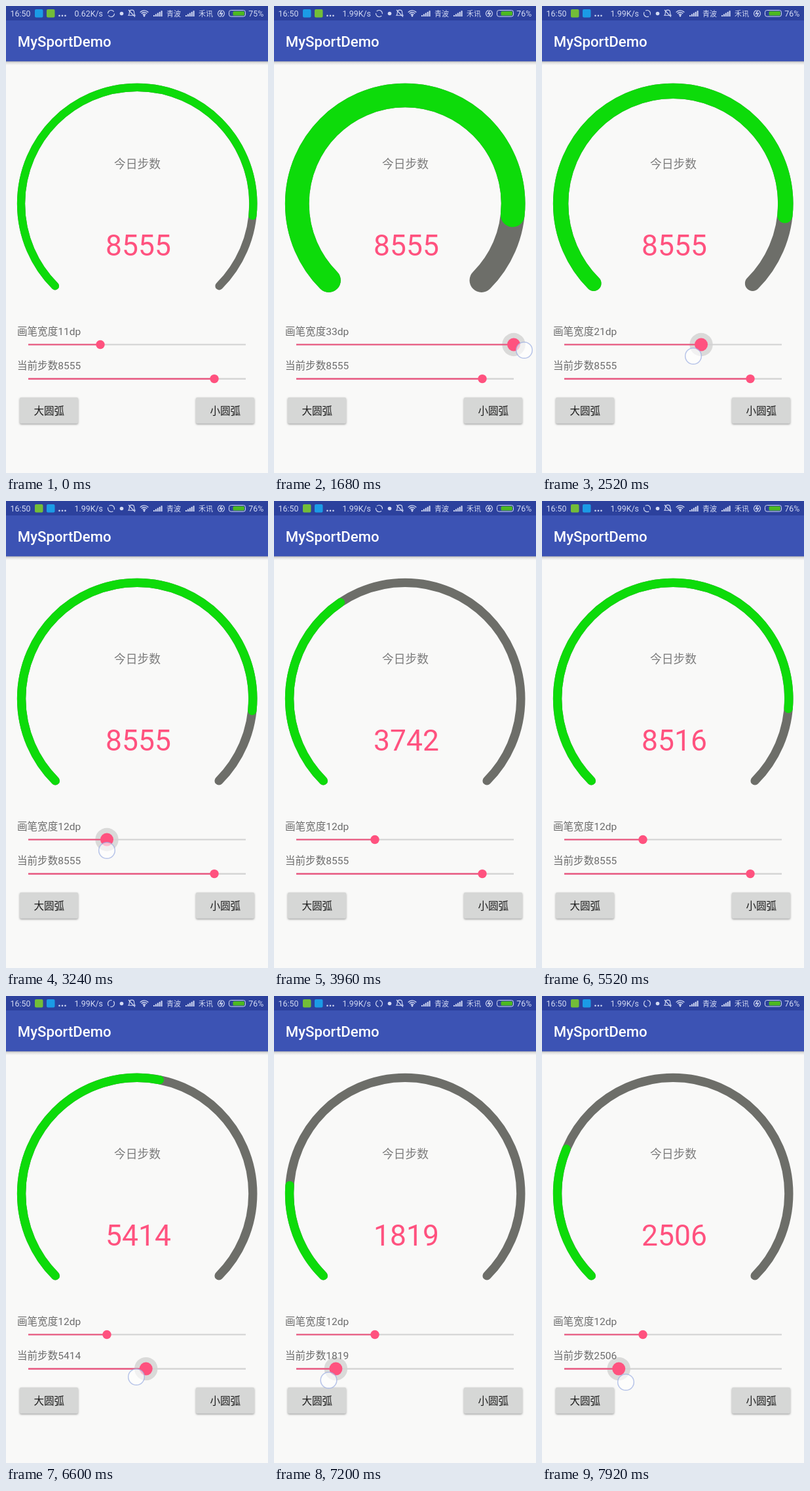
Write an HTML page with a canvas that moves like this. It is 400x711 px and loops after 8 s.

```html
<!DOCTYPE html>
<html lang="zh-CN">
<head>
<meta charset="utf-8">
<title>Step counter</title>
<style>
  html, body { margin: 0; width: 100%; height: 100%; overflow: hidden; background: #f9f9f8; }
  canvas { display: block; width: 400px; height: 711px; }
</style>
</head>
<body>
<canvas id="stage"></canvas>
<script>
const W = 400, H = 711, LOOP = 8000, STEP = 120;
const TAU = Math.PI * 2;
const FONT = 'Roboto, "Noto Sans CJK SC", "Noto Sans CJK", sans-serif';
const PINK = '#ff527f', ICON = '#d3daf3';
const DP = 400 / 360;
const TRACK = { x: 34, length: 332 };
const LAG = 67; // the thumb trails the finger

// Finger paths: [time, x, y]
const widthDrag = {
  from: 120, to: 3300,
  path: [[120, 144, 522], [240, 146, 522], [420, 176, 522], [1080, 366, 523], [1200, 386, 524],
         [1560, 386, 524], [1680, 382, 524], [2520, 231, 533], [2880, 172, 533], [3120, 154, 532]]
};
const stepsDrag = {
  from: 5880, to: LOOP,
  path: [[6000, 318.03, 576], [6120, 304.6, 577], [6600, 199, 580], [7080, 103, 584],
         [7320, 64, 586], [7500, 60.3, 587], [7920, 128, 588]]
};
const count = { start: 3388.7, length: 2285.6, total: 8555 };

const canvas = document.getElementById('stage');
const ctx = canvas.getContext('2d');
const ratio = window.devicePixelRatio || 1;
canvas.width = Math.round(W * ratio);
canvas.height = Math.round(H * ratio);
ctx.scale(ratio, ratio);

const clamp = (v, lo, hi) => Math.min(hi, Math.max(lo, v));

function along(path, t) {
  if (t <= path[0][0]) return path[0].slice(1);
  for (let i = 1; i < path.length; i++) {
    const a = path[i - 1], b = path[i];
    if (t <= b[0]) {
      const k = (t - a[0]) / (b[0] - a[0]);
      return [a[1] + (b[1] - a[1]) * k, a[2] + (b[2] - a[2]) * k];
    }
  }
  return path[path.length - 1].slice(1);
}

const thumbX = (drag, t) =>
  clamp(along(drag.path, t - LAG)[0], TRACK.x, TRACK.x + TRACK.length);
const share = x => (x - TRACK.x) / TRACK.length;
const isHeld = (drag, t) => t >= drag.from && t < drag.to;

function text(str, x, y, size, color, align = 'left', weight = 400) {
  ctx.font = `${weight} ${size}px ${FONT}`;
  ctx.textAlign = align;
  ctx.fillStyle = color;
  ctx.fillText(str, x, y);
}

function rect(x, y, w, h, color, r = 0) {
  ctx.fillStyle = color;
  ctx.beginPath();
  ctx.roundRect(x, y, w, h, r);
  ctx.fill();
}

function dot(x, y, r, color) {
  ctx.fillStyle = color;
  ctx.beginPath();
  ctx.arc(x, y, r, 0, TAU);
  ctx.fill();
}

function arc(x, y, r, a, b, color, width, cap = 'butt') {
  ctx.strokeStyle = color;
  ctx.lineWidth = width;
  ctx.lineCap = cap;
  ctx.beginPath();
  ctx.arc(x, y, r, a, b);
  ctx.stroke();
}

function line(points, color, width) {
  ctx.strokeStyle = color;
  ctx.lineWidth = width;
  ctx.lineCap = 'butt';
  ctx.beginPath();
  points.forEach(([x, y]) => ctx.lineTo(x, y));
  ctx.stroke();
}

function signal(x) {
  for (let i = 0; i < 5; i++) rect(x + i * 2.9, 14 - i * 1.7, 2, 2 + i * 1.7, ICON);
}

function bell(x) {
  ctx.strokeStyle = ICON;
  ctx.lineWidth = 1.1;
  ctx.beginPath();
  ctx.moveTo(x - 5, 14.3);
  ctx.quadraticCurveTo(x - 3.6, 13, x - 3.6, 9.5);
  ctx.bezierCurveTo(x - 3.6, 5, x + 3.6, 5, x + 3.6, 9.5);
  ctx.quadraticCurveTo(x + 3.6, 13, x + 5, 14.3);
  ctx.closePath();
  ctx.stroke();
  line([[x - 5, 6], [x + 5, 16.5]], ICON, 1.1);
}

function statusBar(t) {
  const late = t >= 480, swapped = t >= 2040;
  const blue = '#1b9be6', green = '#73bd38';
  rect(0, 0, W, 22, '#2c419d');
  text('16:50', 6.5, 16, 12.4, ICON);
  rect(44, 5, 12.5, 12.5, swapped ? green : blue, 2);
  rect(62, 5, 12.5, 12.5, swapped ? blue : green, 2);
  [81.5, 86, 90.5].forEach(x => dot(x, 14.7, 1.3, ICON));
  text(late ? '1.99K/s' : '0.62K/s', 148, 16, 12.4, ICON, 'right');

  const turn = t / STEP * 0.5;
  for (const a of [turn, turn + Math.PI]) arc(160.5, 11.5, 5, a, a + 2.55, ICON, 1.2);
  dot(176.5, 11.5, 2.8, ICON);
  bell(192);
  for (const r of [3, 5.8, 8.6]) arc(211, 15.5, r, -Math.PI * 0.76, -Math.PI * 0.24, ICON, 1.4);
  dot(211, 15, 1.4, ICON);
  signal(225);
  text('青波', 245, 15.6, 11, ICON);
  signal(274);
  text('禾讯', 294, 15.6, 11, ICON);

  arc(328.5, 11.5, 5, -1.2, 1.3, ICON, 1.1);
  arc(328.5, 11.5, 5, 1.9, 4.5, ICON, 1.1);
  line([[329.5, 6.5], [326.5, 11.8], [330.5, 11.2], [327.5, 16.5]], ICON, 1.4);
  ctx.strokeStyle = ICON;
  ctx.lineWidth = 1;
  ctx.beginPath();
  ctx.roundRect(340.5, 6.5, 25, 9.5, 3);
  ctx.stroke();
  rect(346.5, 8, 17.5, 6.5, '#4cb821', 1.5);
  text(late ? '76%' : '75%', 393.3, 16, 12.4, ICON, 'right');
}

function appBar() {
  const shade = ctx.createLinearGradient(0, 84, 0, 90);
  shade.addColorStop(0, 'rgba(0,0,0,.27)');
  shade.addColorStop(0.4, 'rgba(0,0,0,.1)');
  shade.addColorStop(1, 'rgba(0,0,0,0)');
  rect(0, 84, W, 6, shade);
  rect(0, 22, W, 62.3, '#3c53b4');
  text('MySportDemo', 17.8, 62, 22.2, '#fff', 'left', 500);
}

function gauge(dp, steps) {
  const w = dp * DP, r = 183.3 - w / 2, start = Math.PI * 0.75, sweep = Math.PI * 1.5;
  arc(200.2, 301, r, start, start + sweep, '#6d6e69', w, 'round');
  arc(200.2, 301, r, start, start + sweep * steps / 10000, '#0ddb0a', w, 'round');
  text('今日步数', 200.5, 247, 17.8, '#7b7b7b', 'center');
  text(String(steps), 202, 380, 44.4, PINK, 'center');
}

function slider(x, y, held) {
  if (held) dot(x, y, 17.7, '#dadad9');
  rect(TRACK.x, y - 1.1, TRACK.length, 2.2, '#d2d2d2');
  rect(TRACK.x, y - 1.1, x - TRACK.x, 2.2, '#ec4f7b');
  dot(x, y, held ? 10 : 6.7, PINK);
}

function button(label, x) {
  ctx.save();
  ctx.shadowColor = 'rgba(0,0,0,.36)';
  ctx.shadowBlur = 3 * ratio;
  ctx.shadowOffsetY = 1.3 * ratio;
  rect(x, 596, 89, 39.8, '#d6d7d6', 2);
  ctx.restore();
  text(label, x + 44.7, 621.6, 15.55, '#1c1c1c', 'center', 500);
}

function finger(drag, t) {
  if (!isHeld(drag, t)) return;
  const [x, y] = along(drag.path, t);
  dot(x, y, 12.3, 'rgba(255,255,255,.62)');
  arc(x, y, 12.3, 0, TAU, 'rgba(157,174,226,.72)', 1.5);
}

function shownSteps(t, chosen) {
  const p = (t - count.start) / count.length;
  if (p < 0 || p >= 1) return chosen;
  return Math.floor(count.total * (1 - (1 - p) ** 2));
}

function draw(t) {
  const x1 = thumbX(widthDrag, t), x2 = thumbX(stepsDrag, t);
  const dp = Math.round(share(x1) * 33);
  const chosen = Math.round(share(x2) * 10000);

  rect(0, 0, W, H, '#f9f9f8');
  appBar();
  statusBar(t);
  gauge(dp, shownSteps(t, chosen));
  slider(x1, 515.5, isHeld(widthDrag, t));
  slider(x2, 567.6, isHeld(stepsDrag, t));
  text(`画笔宽度${dp}dp`, 17, 501.3, 15.55, '#6c6c6c');
  text(`当前步数${chosen}`, 17, 553.4, 15.55, '#6c6c6c');
  button('大圆弧', 21);
  button('小圆弧', 290);
  finger(widthDrag, t);
  finger(stepsDrag, t);
}

function frame() {
  const t = performance.now() % LOOP;
  draw(Math.floor(t / STEP) * STEP);
  requestAnimationFrame(frame);
}
frame();
</script>
</body>
</html>
```
